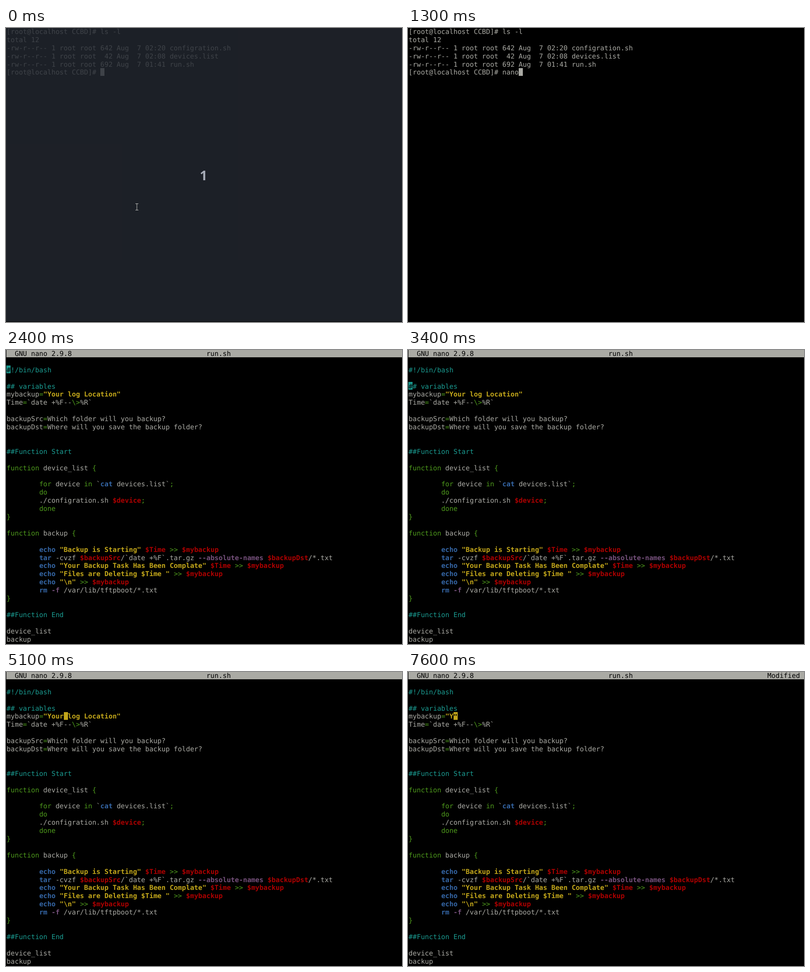
An HTML page that plays this animation: 869x645 px, repeating every 8000 ms.

```html
<!DOCTYPE html>
<html lang="en">
<head>
<meta charset="utf-8">
<title>Terminal session</title>
<style>
  :root { --x0: 1.3px; --cw: 8.955px; --lh: 17.91px; --fg: #aaaaa4; --teal: #1a9a90; --green: #4e9a1c; --yellow: #c2a61a; }
  html, body { margin: 0; width: 100%; height: 100%; overflow: hidden; background: #000; }
  #stage { position: relative; width: 869px; height: 645px; overflow: hidden; background: #000; }
  pre, #cursor {
    position: absolute; left: var(--x0); top: -.1px; margin: 0; white-space: pre;
    font: 14.875px/var(--lh) "DejaVu Sans Mono", monospace;
    text-rendering: geometricPrecision; font-variant-ligatures: none; color: var(--fg);
  }
  #bar { position: absolute; left: 1px; top: 0; width: 868px; height: 16px; background: var(--fg); }
  /* the block starts 1.5px above the text line, so its glyph sits lower inside it */
  #cursor { width: var(--cw); height: 17px; line-height: calc(var(--lh) + 3px); color: #000; }
  #head { color: #000; }
  .t { color: var(--teal); }
  .g { color: var(--green); }
  .y, .b, .r, .p { font-weight: bold; }
  .y { color: var(--yellow); }
  .b { color: #3465a4; }
  .r { color: #ac0000; }
  .p { color: #75507b; }
  svg { position: absolute; left: 0; top: 0; }
  [hidden] { display: none !important; }
</style>
</head>
<body>
<div id="stage">
<pre id="shell">[root@localhost CCBD]# ls -l
total 12
-rw-r--r-- 1 root root 642 Aug  7 02:20 configration.sh
-rw-r--r-- 1 root root  42 Aug  7 02:08 devices.list
-rw-r--r-- 1 root root 692 Aug  7 01:41 run.sh
[root@localhost CCBD]# <span id="command"></span></pre>
<div id="nano" hidden><div id="bar"></div><pre><span id="head"></span>

<span class="t">#!/bin/bash</span>

<span class="t">## variables</span>
mybackup<span class="g">=</span><span class="y" id="value"></span>
Time<span class="g">=</span>`date +%F--<span class="g">\&gt;</span>%R`

backupSrc<span class="g">=</span>Which folder will you backup?
backupDst<span class="g">=</span>Where will you save the backup folder?


<span class="t">##Function Start</span>

<span class="g">function</span> device_list <span class="g">{</span>

        <span class="g">for</span> device <span class="g">in</span> `<span class="b">cat</span> devices.list`<span class="g">;</span>
        <span class="g">do</span>
        ./configration.sh <span class="r">$device</span><span class="g">;</span>
        <span class="g">done</span>
<span class="g">}</span>

<span class="g">function</span> backup <span class="g">{</span>

        <span class="b">echo</span> <span class="y">"Backup is Starting"</span> <span class="r">$Time</span> <span class="g">&gt;&gt;</span> <span class="r">$mybackup</span>
        <span class="b">tar</span> -cvzf <span class="r">$backupSrc</span>/`date +%F`.tar.gz <span class="p">--absolute-names</span> <span class="r">$backupDst</span>/*.txt
        <span class="b">echo</span> <span class="y">"Your Backup Task Has Been Complate"</span> <span class="r">$Time</span> <span class="g">&gt;&gt;</span> <span class="r">$mybackup</span>
        <span class="b">echo</span> <span class="y">"Files are Deleting $Time "</span> <span class="g">&gt;&gt;</span> <span class="r">$mybackup</span>
        <span class="b">echo</span> <span class="y">"\n"</span> <span class="g">&gt;&gt;</span> <span class="r">$mybackup</span>
        <span class="b">rm</span> <span class="p">-f</span> /var/lib/tftpboot/*.txt
<span class="g">}</span>

<span class="t">##Function End</span>

device_list
backup</pre></div>
<div id="cursor"></div>
<svg width="869" height="645">
  <g id="countdown">
    <rect width="869" height="644" fill="#242831" fill-opacity=".8"/>
    <text x="433.5" y="334" text-anchor="middle" font-family="'Noto Sans', sans-serif" font-weight="600" font-size="29" fill="#a6abb7">1</text>
  </g>
  <path id="mouse" d="M284 385.5H290.5M287.2 386V399M284 399.5H290.5" fill="none" stroke="#c4c4c0"/>
</svg>
</div>
<script>
const LOOP = 8000, NANO_START = 2400, DELETE_START = 6900;
const PROMPT_COLS = 23, VALUE_COL = 9, VALUE_ROW = 5;
const COMMAND = "nano run.sh ", VALUE = "Your log Location";

// [time, characters typed]
const typing = [[0, 0], [700, 1], [800, 3], [1300, 4], [1600, 5], [1900, 7], [2000, 12]];

// [time, row, column]; no row hides the cursor
const moves = [
  [2400, 2, 0], [2900], [3100, 2, 0],
  [3300, 3, 0], [3400, 4, 0], [3500, 5, 0], [3600, 6, 0], [3800, 6, 1],
  [4300, 6, 2], [4400, 5, 2],
  [4900, 5, 7], [5000, 5, 11], [5100, 5, 14], [5200, 5, 17], [5300, 5, 20], [5400, 5, 22], [5500, 5, 23],
  [5700, 5, 24], [5800, 5, 25], [6000, 5, 26], [6100, 5, 27],
  [6900, 5, 26], [7100, 5, 22], [7300, 5, 14], [7500, 5, 12], [7600, 5, 11]
];

const $ = id => document.getElementById(id);
const at = (steps, t) => steps.findLast(step => step[0] <= t);
const setText = (el, text) => { if (el.textContent !== text) el.textContent = text; };

function placeCursor(row, col, char = "", color = "var(--fg)", bold = false) {
  const cursor = $("cursor");
  cursor.hidden = row === undefined;
  if (cursor.hidden) return;
  setText(cursor, char);
  cursor.style.left = `calc(var(--x0) + ${col} * var(--cw))`;
  cursor.style.top = `calc(${row} * var(--lh) - 1.6px)`;
  cursor.style.background = color;
  cursor.style.fontWeight = bold ? "bold" : "normal";
}

function drawShell(t) {
  const typed = at(typing, t)[1];
  setText($("command"), COMMAND.slice(0, typed));
  placeCursor(5, PROMPT_COLS + typed);
}

function drawNano(t) {
  const [, row, col] = at(moves, t);
  const deleting = t >= DELETE_START;
  const kept = deleting ? col - VALUE_COL - 1 : VALUE.length;
  const value = `"${VALUE.slice(0, kept)}"`;
  setText($("head"), "  GNU nano 2.9.8".padEnd(49) + "run.sh".padEnd(39) + (deleting ? "Modified" : ""));
  setText($("value"), value);

  const lines = { 2: "#!/bin/bash", 4: "## variables", 5: "mybackup=" + value, 6: "Time=" };
  const inValue = row === VALUE_ROW && col >= VALUE_COL;
  const color = inValue ? "var(--yellow)" : row === 2 || row === 4 ? "var(--teal)" : "var(--fg)";
  placeCursor(row, col, lines[row]?.[col], color, inValue);
}

function frame(now) {
  const t = now % LOOP;
  const editing = t >= NANO_START;
  $("countdown").style.display = t < 100 ? "" : "none";
  $("mouse").style.display = t < 500 ? "" : "none";
  $("shell").hidden = editing;
  $("nano").hidden = !editing;
  (editing ? drawNano : drawShell)(t);
}

let start;
function tick(now) {
  start ??= now;
  frame(now - start);
  requestAnimationFrame(tick);
}
frame(0);
requestAnimationFrame(tick);
</script>
</body>
</html>
```
